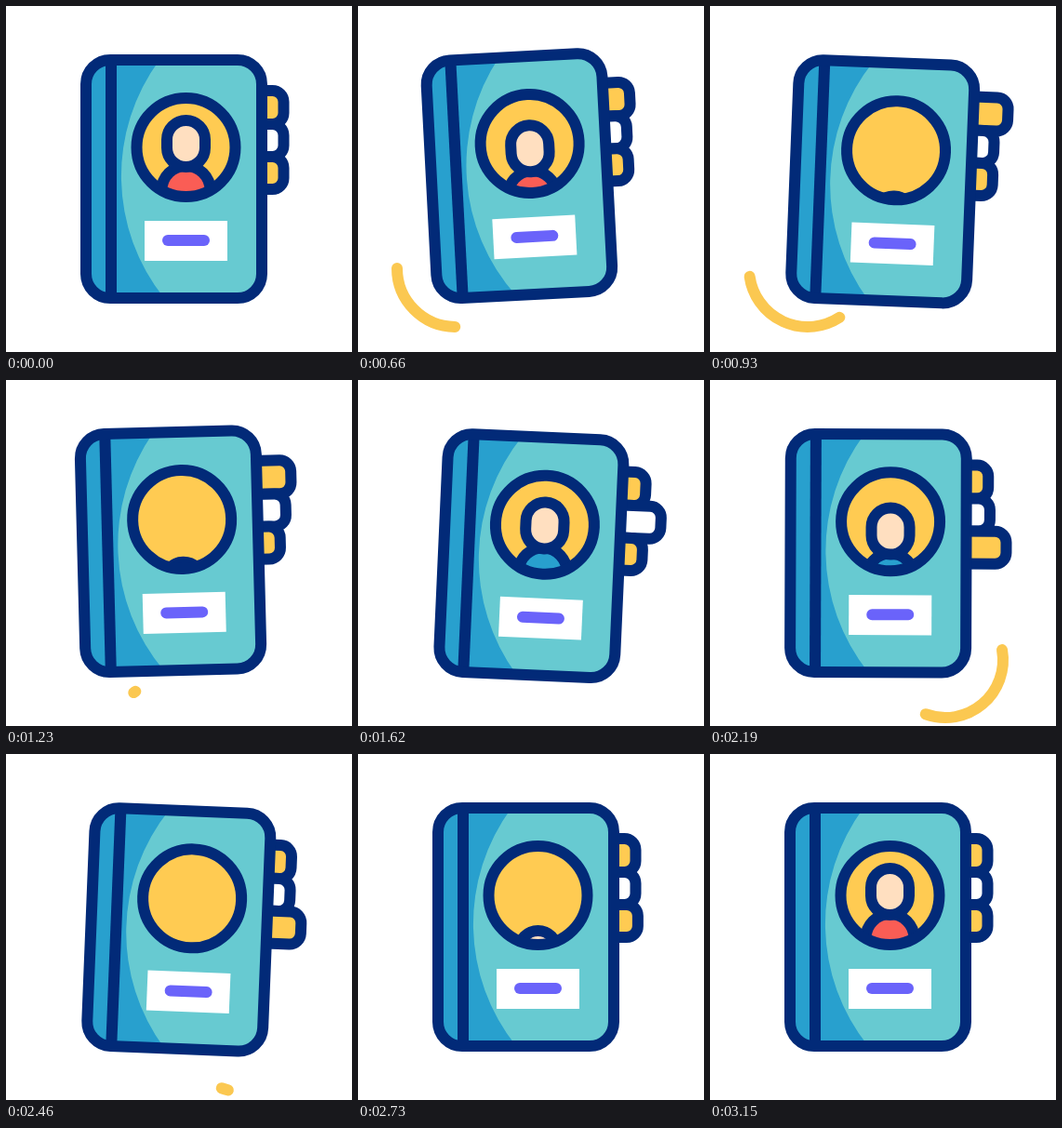
These frames come from a looping animation (372x372 px, 4.8 s). An HTML page:

```html
<!DOCTYPE html>
<html lang="en">
<head>
<meta charset="utf-8">
<title>Contact book</title>
<style>
  html, body { margin: 0; width: 100%; height: 100%; overflow: hidden; background: #fff; }
  svg { display: block; width: 100%; height: 100%; }
  .line { stroke: #022a78; stroke-width: 12; }
  .swoosh { fill: none; stroke: #fbc851; stroke-width: 12; stroke-linecap: round; }
</style>
</head>
<body>
<svg viewBox="0 0 372 372">
  <defs>
    <clipPath id="portrait"><circle cx="193.5" cy="152" r="50"/></clipPath>
    <clipPath id="cover"><rect x="86" y="58" width="189" height="256" rx="26"/></clipPath>
  </defs>
  <path id="leftSwoosh" class="swoosh"/>
  <path id="rightSwoosh" class="swoosh"/>
  <g id="book">
    <g class="line">
      <rect class="tab" x="238" y="91" width="60.5" height="36" rx="12" fill="#ffcb52"/>
      <rect class="tab" x="238" y="127" width="60.5" height="35" rx="12" fill="#fff"/>
      <rect class="tab" x="238" y="162" width="60.5" height="35" rx="12" fill="#ffcb52"/>
    </g>
    <g clip-path="url(#cover)">
      <rect x="86" y="58" width="189" height="256" fill="#67cad1"/>
      <path d="M86 58H165A210 210 0 0 0 170 314H86Z" fill="#28a0ce"/>
    </g>
    <path class="line" d="M113 58V314"/>
    <rect class="line" x="86" y="58" width="189" height="256" rx="26" fill="none"/>
    <circle cx="193.5" cy="152" r="53" fill="#ffcb52"/>
    <g clip-path="url(#portrait)">
      <g id="person" class="line">
        <circle id="body" cx="193.5" cy="198" r="26"/>
        <rect x="173" y="123" width="41" height="50" rx="20.5" fill="#ffdfc0"/>
      </g>
    </g>
    <circle class="line" cx="193.5" cy="152" r="53" fill="none"/>
    <rect x="149" y="231" width="89" height="43" fill="#fff"/>
    <rect x="168" y="246" width="51" height="12" rx="6" fill="#6a63fa"/>
  </g>
</svg>
<script>
const LOOP = 4800;
const SWING = 336;
const TILTS = [0, -3, 3, -3, 3, -3, 3, 0];
const TAB_REACH = [15.2, 19.5, 19.5];
const $ = id => document.getElementById(id);
const tabs = document.querySelectorAll('.tab');

// Sinusoidal ease from 0 to 1 between two times.
function ease(t, start, end) {
  const p = Math.min(1, Math.max(0, (t - start) / (end - start)));
  return (1 - Math.cos(Math.PI * p)) / 2;
}

function tiltAt(t) {
  return TILTS.slice(1).reduce((angle, next, i) =>
    angle + (next - TILTS[i]) * ease(t, SWING * (i + 1), SWING * (i + 2)), 0);
}

// An arc whose head runs ahead and whose tail follows later.
function drawSwoosh(path, t, start, cx, cy, r, from, to) {
  const head = ease(t, start, start + 425);
  const tail = ease(t, start + 480, start + 880);
  const point = share => {
    const a = (from + (to - from) * share) * Math.PI / 180;
    return `${cx + r * Math.cos(a)} ${cy + r * Math.sin(a)}`;
  };
  const sweep = to > from ? 1 : 0;
  const visible = head > 0 && tail < 1;
  path.setAttribute('d', visible
    ? `M${point(tail)}A${r} ${r} 0 0 ${sweep} ${point(head)}` : '');
}

function draw(t) {
  $('book').setAttribute('transform', `rotate(${tiltAt(t)} 113 320)`);

  tabs.forEach((tab, i) => {
    const local = t - i * 560;
    const out = TAB_REACH[i] * (ease(local, 400, 1070) - ease(local, 1070, 1770));
    tab.setAttribute('transform', `translate(${out} 0)`);
  });

  const drop = 90 * (ease(t, 560, 1045) - ease(t, 1050, 1720)
    + ease(t, 2080, 2505) - ease(t, 2510, 3165));
  $('person').setAttribute('transform', `translate(0 ${drop})`);
  $('body').setAttribute('fill', t > 1047 && t < 2507 ? '#28a0ce' : '#fa5d55');

  drawSwoosh($('leftSwoosh'), t, 385, 105, 282, 63, 180, 57);
  drawSwoosh($('rightSwoosh'), t, 1640, 253, 301, 62, -20, 110);
}

const began = performance.now();
function frame() {
  draw((performance.now() - began) % LOOP);
  requestAnimationFrame(frame);
}
frame();
</script>
</body>
</html>
```
